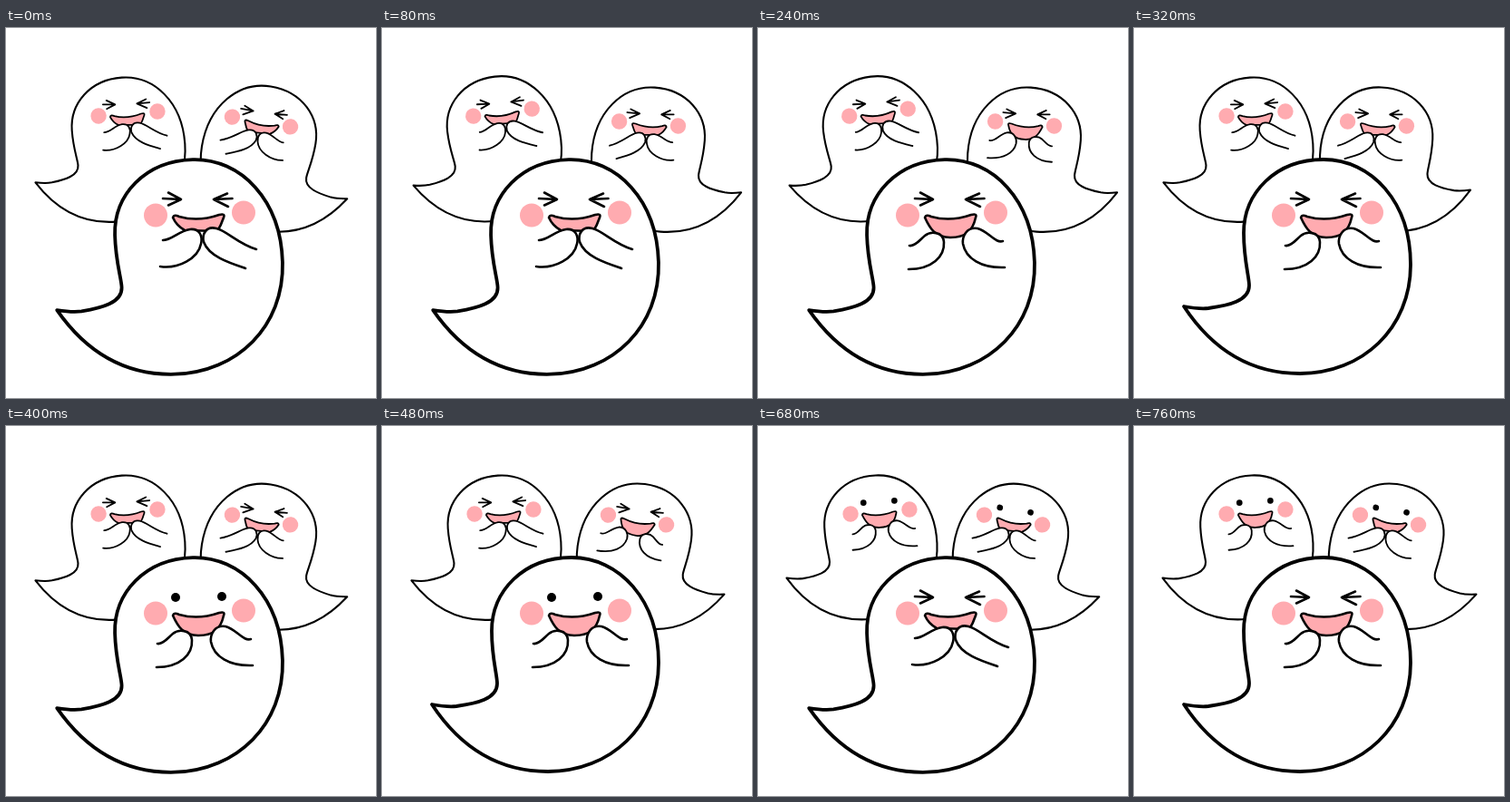
Animation, 408 px wide and 408 px high, one loop 0.8 s. Source, as an HTML page:

```html
<!DOCTYPE html>
<html lang="en">
<head>
<meta charset="utf-8">
<title>Giggling ghosts</title>
<style>
html, body { margin: 0; width: 100%; height: 100%; overflow: hidden; background: #fff; }
svg { display: block; width: 100vw; height: 100vh; }
path { fill: #fff; stroke: #000; stroke-linecap: round; stroke-linejoin: round; }
.ghost { stroke-width: 2.7; }
.body { stroke-width: 3.1; }
.big { stroke-width: 2.6; }
.big .body { stroke-width: 3.8; }
.shut path { fill: none; }
.pink, .cheek { fill: #ffabb0; }
</style>
</head>
<body>
<svg viewBox="0 0 408 408">
  <defs>
    <g id="cheeks">
      <circle class="cheek" cx="165" cy="206.5" r="13"/>
      <circle class="cheek" cx="262" cy="203.5" r="13"/>
    </g>
  </defs>
</svg>
<script>
const STEP = 40, COUNT = 20;
const svg = document.querySelector('svg');

const BODY = 'M55 307C66 309 73 310 82 309C104 306 127 301 127 284C127 274 121 256 121 226' +
  'C121 182 156 145 209 145C262 145 305 192 305 261C305 331 252 381 183 381C128 381 86 354 55 307Z';
const LIP = 'M184 209Q185 205 191 208Q212 214 235 206Q242 204 240 209';

const parts = `
  <path class="body" d="${BODY}"/>
  <use href="#cheeks"/>
  <g class="shut">
    <path d="M179 181.5L193 189L179 195.5M173 188L193 189"/>
    <path d="M244 182.5L229 189L245 197M249.5 188L229 189"/>
  </g>
  <g class="open">
    <circle cx="187" cy="189" r="5"/>
    <circle cx="238" cy="188" r="5"/>
  </g>
  <g class="near">
    <path class="pink" d="${LIP}Q237 218 233 224L197 223Q188 218 184 209Z"/>
    <path d="M173 234C183 234 190 224 203 222C214 221 217 230 215 238C212 254 190 266 170 263"/>
    <path d="M276 244C256 238 244 224 232 221C220 218 216 228 218 236C224 252 246 259 264 265"/>
  </g>
  <g class="apart">
    <path class="pink" d="${LIP}C237 222 231 231 212 231C195 231 189 220 184 209Z"/>
    <path d="M167 240C173 241 178 234 184 229C190 224 204 224 205 236C206 252 192 266 166 266"/>
    <path d="M270 235C262 238 254 224 242 221C230 219 225 230 226 238C229 254 246 265 272 264"/>
  </g>`;

function makeGhost(big) {
  const g = document.createElementNS('http://www.w3.org/2000/svg', 'g');
  g.setAttribute('class', big ? 'ghost big' : 'ghost');
  g.innerHTML = parts;
  svg.append(g);
  const find = name => g.querySelector('.' + name);
  const show = (name, on) => find(name).setAttribute('display', on ? 'inline' : 'none');
  return {
    pose(near, open, tilt) {
      show('near', near);
      show('apart', !near);
      show('open', open);
      show('shut', !open);
      find('body').setAttribute('transform', tilt ? 'rotate(-1.5 212 262)' : '');
    },
    // x, y is the point midway between the cheeks
    place(x, y, angle, flip) {
      g.setAttribute('transform', `translate(${x} ${y}) rotate(${angle}) ` +
        `scale(${flip ? -0.67 : 0.67} 0.67) translate(-213.5 -205)`);
    }
  };
}

const left = makeGhost(), right = makeGhost(), big = makeGhost(true);

// One digit per step: 1 = hands together, or body tilted
const bigHands   = '10110101010101010110';
const rightHands = '10110100101101010101';
const bodyTilt   = '10100010001000100100';

function draw(i) {
  const bit = s => s[i] === '1';
  const even = i % 2 === 0;
  const bigOpen = i >= 9 && i <= 16, sideOpen = i >= 17;

  big.pose(bit(bigHands), bigOpen, bit(bodyTilt));
  left.pose(even, sideOpen, even);
  right.pose(bit(rightHands), sideOpen, bit(bodyTilt));

  // The side ghosts swing out, peaking at step 4, then snap to rest
  const d = Math.abs(i - 4);
  const back = 59.5 * Math.pow(d / 4, 0.83);
  if (i > 0 && i < 8) left.place(99.5 + Math.min(back, 35), 95.5 - Math.min(d, 2) * 1.2, -6.1 + Math.min(d, 3) * 0.4);
  else left.place(134.5, 94.5, -2.6);
  if (i > 0 && i < 9) right.place(327.5 - back, 105.5, 2.6, true);
  else right.place(281.5, 103.5, 7.8, true);
}

const start = performance.now();
function tick() {
  draw(Math.floor((performance.now() - start) / STEP) % COUNT);
  requestAnimationFrame(tick);
}
draw(0);
requestAnimationFrame(tick);
</script>
</body>
</html>
```
